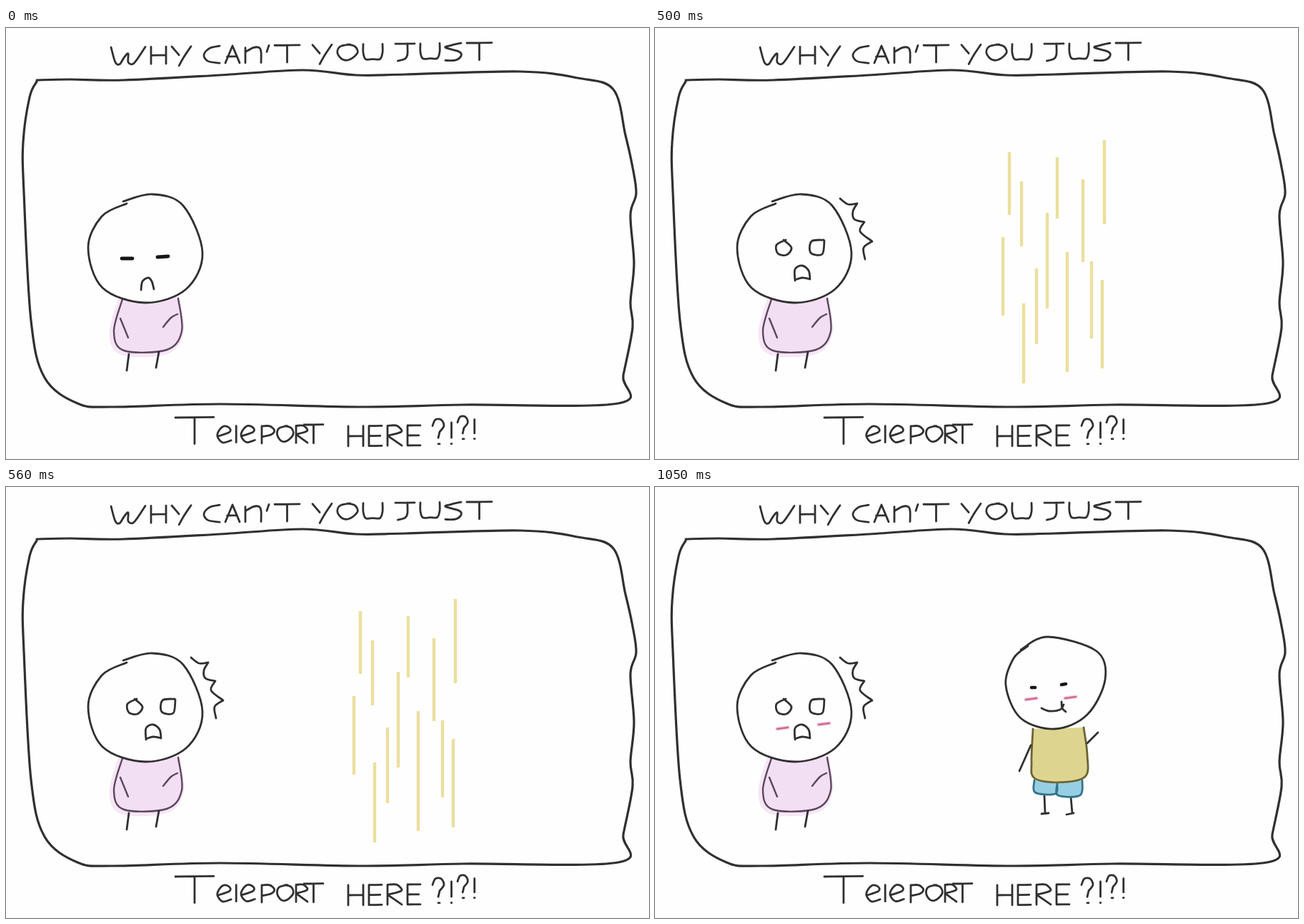
These frames come from a looping animation (900 px wide and 604 px high, 1.35 s). An HTML page with a canvas:

```html
<!DOCTYPE html>
<html lang="en">
<head>
<meta charset="utf-8">
<title>Why can't you just teleport here?!?!</title>
<style>
  html, body { margin: 0; width: 100%; height: 100%; overflow: hidden; background: #fefefe; }
  canvas { display: block; width: 900px; height: 604px; filter: blur(0.6px); }
</style>
</head>
<body>
<canvas id="stage" width="900" height="604" role="img" aria-label="Why can't you just teleport here?!?!"></canvas>
<script>
const ctx = document.getElementById('stage').getContext('2d');
const LOOP = 1350, FLASH = 500, ARRIVE = 600;
const PAPER = '#fefefe', INK = '#303030', PEN = 2.8;

// Smooth curve through a list of points, added to a path
function addCurve(path, p) {
  path.moveTo(...p[0]);
  for (let i = 0; i < p.length - 1; i++) {
    const a = p[i - 1] || p[i], b = p[i], c = p[i + 1], d = p[i + 2] || c;
    path.bezierCurveTo(
      b[0] + (c[0] - a[0]) / 6, b[1] + (c[1] - a[1]) / 6,
      c[0] - (d[0] - b[0]) / 6, c[1] - (d[1] - b[1]) / 6, c[0], c[1]);
  }
  return path;
}

// Each "x,y x,y ..." string is one pen stroke
function sketch(...lines) {
  const path = new Path2D();
  for (const line of lines) addCurve(path, line.trim().split(/\s+/).map(s => s.split(',').map(Number)));
  return path;
}

function ink(path, width = PEN, color = INK, cap = 'round') {
  ctx.lineWidth = width;
  ctx.strokeStyle = color;
  ctx.lineCap = cap;
  ctx.lineJoin = 'round';
  ctx.stroke(path);
}

function paint(path, color, edge, width) {
  ctx.fillStyle = color;
  ctx.fill(path);
  ink(path, width, edge);
}

// Pen alphabet: width, then strokes as digit pairs on an 8 by 8 grid
const glyphs = {
  W: [48, '001728354347586680'],
  H: [21, '0008 8088 0484'],
  Y: [27, '0034 805539'],
  C: [22, '8031042788'],
  A: [20, '0840 4088 1565'],
  n: [22, '0108 0341718388'],
  "'": [3, '8003'],
  T: [35, '0080 4048'],
  O: [28, '5011042757847140'],
  U: [27, '00041747778480'],
  J: [27, '0080 50554718'],
  S: [22, '80310274865808'],
  e: [24, '0573714012053887'],
  l: [0, '0008'],
  P: [22, '0008 0050826405'],
  R: [20, '0008 0050826304 0488'],
  E: [18, '0008 0080 0474 0888'],
  '?': [16, '0220608254 5446 4858'],
  '!': [3, '4146 3858']
};
const SLOPE = -0.012;

function write(text, x, y, height = 24, scale = 1, gap = 8) {
  const path = new Path2D();
  const left = x;
  for (const char of text) {
    if (char === ' ') {
      x += 10;
      continue;
    }
    const [size, strokes] = glyphs[char];
    const width = size * scale;
    for (const stroke of strokes.split(' ')) {
      addCurve(path, stroke.match(/../g).map(([u, v]) => {
        const px = x + u * width / 8;
        return [px, y + v * height / 8 + (px - left) * SLOPE];
      }));
    }
    x += width + gap;
  }
  ink(path);
}

function drawText() {
  write("WHY CAn'T YOU JUST", 147, 27);
  write('T', 237, 546, 37, 1.54);
  write('ele', 296, 558, 23, 0.8, 7);
  write('POR', 358, 558, 24, 0.8, 4);
  write('T', 417, 556, 26, 0.77);
  write('HERE', 479, 558, 28);
  write('?!', 597, 549, 34, 1, 9);
  write('?!', 632, 545, 31, 0.9);
}

const border = sketch(`43,73 90,72 165,73 300,66 415,59 490,66 560,65 720,61 800,70 850,86
  867,150 877,195 882,232 874,262 879,330 874,385 877,420 864,487 857,526
  640,528 500,531 300,527 150,531 100,526 54,490 35,410 25,230 24,160 33,97 43,75`);

const girl = {
  head: sketch('164,243 205,233 248,249 275,315 252,366 195,385 135,364 115,308 134,264 169,246'),
  body: sketch('163,380 151,425 165,452 225,451 246,425 241,379'),
  arms: sketch('160,407 171,434', '240,401 231,406 220,419'),
  legs: sketch('172,457 169,480', '214,454 210,476'),
  frown: sketch('189,367 191,355 199,350 204,355 207,366'),
  lids: sketch('162,323 177,323', '212,321 227,320'),
  eyes: sketch('183,297 170,304 172,316 184,318 191,308 180,297',
    '236,297 219,299 218,315 234,317 237,298'),
  mouth: sketch('196,354 196,338 206,333 215,340 217,352', '217,352 206,350 196,353'),
  shock: sketch('259,239 270,247 283,246', '283,246 277,257 279,268 293,272',
    '293,272 287,285 304,299', '304,299 292,308 294,324')
};

const boy = {
  head: sketch('512,228 550,210 618,230 630,270 605,319 560,339 512,324 491,278 502,240 522,223'),
  shirt: sketch('529,339 527,385 531,408 565,414 602,406 605,375 600,337'),
  shorts: sketch('531,411 532,428 560,430 563,416', '563,416 564,432 595,432 598,411'),
  arms: sketch('526,362 510,398', '605,359 620,344'),
  legs: sketch('545,433 546,457', '541,458 551,457', '582,434 584,457', '576,459 586,457'),
  eyes: sketch('527,281 532,281', '569,277 575,276'),
  smile: sketch('541,310 552,314 567,312 572,305', '569,301 570,310 575,315')
};

const beam = new Path2D(`M496 174v88 M513 215v91 M563 181v86 M549 259v134 M599 212v116 M629 157v118
  M487 293v110 M534 337v106 M577 314v168 M611 327v108 M626 353v124 M516 386v112`);

function blush(x, y) {
  const cheek = sketch(`${x},${y} ${x + 15},${y - 2}`);
  ink(cheek, 5.5, '#f6d6e2');
  ink(cheek, 2.6, '#cf6690');
}

function drawGirl(shocked) {
  ctx.save();
  ctx.translate(-2, 2);
  ink(girl.body, 9, '#f6e6f6');
  ctx.restore();
  paint(girl.body, '#f3dff4', '#5c465c', 2.4);
  ink(girl.arms, 2.4, '#5c465c');
  ink(girl.legs);
  paint(girl.head, PAPER, INK, PEN);
  if (shocked) {
    for (const part of [girl.eyes, girl.mouth, girl.shock]) ink(part);
  } else {
    ink(girl.lids, 4.8, '#151515');
    ink(girl.frown);
  }
}

function drawBoy() {
  ink(boy.legs);
  paint(boy.shorts, '#96cfe3', '#32738a', PEN);
  paint(boy.shirt, '#ddd58f', '#6b6434', PEN);
  ink(boy.arms);
  paint(boy.head, PAPER, INK, PEN);
  ink(boy.eyes, 4.6, '#151515');
  ink(boy.smile);
  blush(519, 298);
  blush(574, 296);
}

function draw(t) {
  ctx.fillStyle = PAPER;
  ctx.fillRect(0, 0, 900, 604);
  drawText();
  ink(border, 3.2);
  drawGirl(t >= FLASH);
  if (t >= ARRIVE) {
    blush(171, 339);
    blush(229, 333);
    drawBoy();
  } else if (t >= FLASH) {
    ink(beam, 4.4, '#ecdf9e', 'butt');
  }
}

const start = performance.now();
function tick() {
  draw((performance.now() - start) % LOOP);
  requestAnimationFrame(tick);
}
tick();
</script>
</body>
</html>
```
